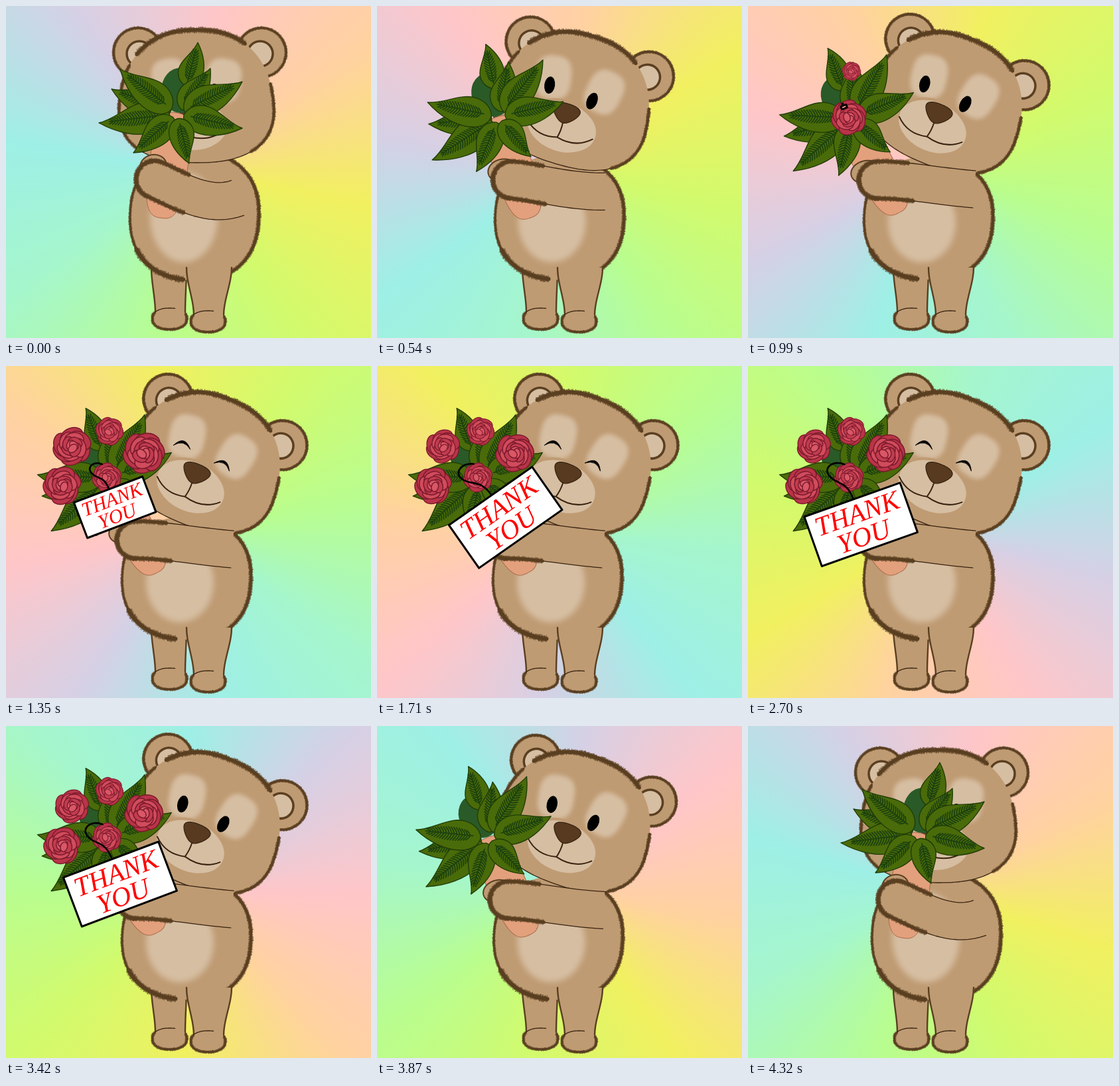
These frames come from a looping animation (550x500 px, 4410 ms). An HTML page with a canvas:

```html
<!DOCTYPE html>
<html lang="en">
<head>
<meta charset="utf-8">
<title>Thank you bear</title>
<style>
  html, body { margin: 0; width: 550px; height: 500px; overflow: hidden; }
  canvas { display: block; }
</style>
</head>
<body>
<canvas id="stage" width="550" height="500"></canvas>
<script>
const ctx = document.getElementById('stage').getContext('2d');
const LOOP = 4410, STEP = 90, TAU = Math.PI * 2;
const FUR = '#bf9b73', PALE = '#d6bea2', FRINGE = '#5a3f21', INK = '#382311';

const rad = d => d * Math.PI / 180;
const mix = (a, b, p) => a + (b - a) * p;
const mixPt = (a, b, p) => a.map((v, i) => mix(v, b[i], p));
const seg = (t, a, b) => Math.min(1, Math.max(0, (t - a) / (b - a)));
const ease = u => u * u * (3 - 2 * u);
const noise = n => { const v = Math.sin(n * 12.9898) * 43758.5453; return v - Math.floor(v); };

// ---------- drawing helpers ----------
function paint(fill, line, width = 1.3) {
  if (fill) { ctx.fillStyle = fill; ctx.fill(); }
  if (line) { ctx.strokeStyle = line; ctx.lineWidth = width; ctx.stroke(); }
}

function trace(pts) {
  ctx.beginPath();
  pts.forEach(p => ctx.lineTo(p[0], p[1]));
}

function line(pts, color = INK, width = 1.3) { trace(pts); paint(null, color, width); }

function oval(x, y, rx, ry, rot, fill, stroke, width) {
  ctx.beginPath();
  ctx.ellipse(x, y, rx, ry, rad(rot), 0, TAU);
  paint(fill, stroke, width);
}

// Rounded shape: n squares it off, k widens its lower half.
function ring({ x, y, rx, ry, rot = 0, n = 2, k = 0 }, from = 0, to = 360) {
  const pts = [], bend = v => Math.sign(v) * Math.abs(v) ** (2 / n);
  const c = Math.cos(rad(rot)), s = Math.sin(rad(rot));
  for (let a = from; a <= to; a += 2) {
    const v = bend(Math.sin(rad(a))), py = ry * v;
    const px = rx * bend(Math.cos(rad(a))) * (1 + k * v);
    pts.push([x + px * c - py * s, y + px * s + py * c]);
  }
  return pts;
}

function fill(pts, color, stroke, width) {
  trace(pts);
  ctx.closePath();
  paint(color, stroke, width);
}

// Dark fuzzy edge: a solid band with fine hairs on both sides.
function fringe(pts, w) {
  line(pts, FRINGE, w * 0.65);
  ctx.beginPath();
  for (let i = 1, id = 0; i < pts.length; i++) {
    const [x, y] = pts[i - 1], dx = pts[i][0] - x, dy = pts[i][1] - y;
    const d = Math.hypot(dx, dy) || 1;
    for (let m = 0; m < d; m += 0.9, id++) {
      const px = x + dx * m / d, py = y + dy * m / d;
      const a = w * (0.3 + 0.3 * noise(id)), b = w * (0.3 + 0.3 * noise(id + 500));
      ctx.moveTo(px - dy / d * a, py + dx / d * a);
      ctx.lineTo(px + dy / d * b, py - dx / d * b);
    }
  }
  paint(null, FRINGE, 0.8);
}

function soft(px, draw) {
  ctx.filter = `blur(${px}px)`;
  draw();
  ctx.filter = 'none';
}

function group(x, y, angle, draw) {
  ctx.save();
  ctx.translate(x, y);
  ctx.rotate(rad(angle));
  draw();
  ctx.restore();
}

// ---------- backdrop ----------
const WHEEL = ['#ffc6c8', '#ffd2a0', '#f1f060', '#d2fa6c', '#b8fd90', '#a5f6cc', '#9eefe6', '#d6d0e5'];

function backdrop(t) {
  const g = ctx.createConicGradient(rad(-80) - TAU * t / LOOP, 275, 250);
  for (let i = 0; i <= 8; i++) g.addColorStop(i / 8, WHEEL[i % 8]);
  ctx.fillStyle = g;
  ctx.fillRect(0, 0, 550, 500);
}

// ---------- bear ----------
function leg(left, right, lowLeft, lowRight, y) {
  const side = (top, low) => {
    const pts = [];
    for (let u = 0; u <= 1; u += 0.1) pts.push([mix(top, low, ease(u)), mix(394, y - 9, u)]);
    return pts;
  };
  const a = side(left, lowLeft), b = side(right, lowRight);
  const foot = { x: (lowLeft + lowRight) / 2 - 1, y, rx: 26, ry: 16, n: 2.3 };
  fill([...a, ...b.reverse()], FUR);
  line(a, FRINGE, 2.4);
  line(b, FRINGE, 2.4);
  fill(ring(foot), FUR);
  fringe(ring(foot, -25, 215), 4);
  line(ring(foot, 215, 285));
}

function torso(p) {
  const body = { x: mix(284, 272, p), y: mix(316, 320, p), rx: 97, ry: mix(97, 92, p), rot: 3, n: 2.3 };
  fill(ring(body), FUR);
  soft(4, () => oval(mix(268, 262, p), mix(318, 326, p), 51, mix(68, 60, p), 0, PALE));
  fringe(ring(body, -65, 55), 6);
  fringe(ring(body, 150, 225), 4);
  fringe(ring(body, 95, 150), 9);
}

function eye(x, y, tilt, shut) {
  group(x, y, tilt, () => {
    if (!shut) return oval(0, 0, 8, 13, 0, '#000');
    ctx.beginPath();
    ctx.moveTo(-13, 5);
    ctx.quadraticCurveTo(0, -15, 13, 5);
    ctx.quadraticCurveTo(0, -8, -13, 5);
    paint('#000', '#000', 0.8);
  });
}

function face(shut) {
  soft(3, () => [-1, 1].forEach(s =>
    fill(ring({ x: s * 40, y: -24, rx: 27, ry: 33, rot: s * 10, n: 2.8 }), PALE)));
  oval(-7, 44, 55, 39, 2, PALE, FUR, 4);
  eye(-42, -11, -8, shut);
  eye(26, -6, 6, shut);
  fill(ring({ x: -7, y: 23, rx: 19, ry: 15, n: 2.2, k: -0.45 }), '#573a1f', INK);
  ctx.beginPath();
  ctx.moveTo(-7, 38);
  ctx.quadraticCurveTo(-6, 50, -9, 61);
  for (const s of [-1, 1]) {
    ctx.moveTo(-9, 61);
    ctx.quadraticCurveTo(-8 + s * 30, 69, -8 + s * 51, 49);
  }
  paint(null, INK, 2);
}

function head(p, shut) {
  const skull = { x: 0, y: 0, rx: 115, ry: 100, n: 2.4, k: 0.12 };
  group(mix(287, 301, p), mix(136, 143.5, p), mix(0, 22.1, p), () => {
    for (const s of [-1, 1]) {
      const ear = { x: 5 + s * 93, y: -66, rx: 37, ry: 37 };
      fill(ring(ear), FUR);
      fringe(ring(ear), 4);
      oval(ear.x - s * 2, ear.y + 2, 19, 19, 0, PALE, FRINGE, 3.5);
    }
    fill(ring(skull), FUR);
    line(ring(skull, 50, 130));
    fringe(ring(skull, -8, 55), 5);
    fringe(ring(skull, 130, 205), 5);
    fringe(ring(skull, 215, 312), 8);
    face(shut);
  });
}

// Spine of the arm, hand first.
const ARM_UP = [[224, 261], [262, 278], [305, 305], [349, 289]];
const ARM_OUT = [[195, 262], [235, 261], [280, 271], [341, 276]];

function arm(p) {
  const [a, b, c, d] = ARM_UP.map((v, i) => mixPt(v, ARM_OUT[i], p));
  const r = 28, top = [], low = [];
  let tilt;
  for (let i = 20; i >= 0; i--) {
    const u = i / 20, w = 1 - u;
    const at = j => w ** 3 * a[j] + 3 * w * w * u * b[j] + 3 * w * u * u * c[j] + u ** 3 * d[j];
    const slope = j => w * w * (b[j] - a[j]) + 2 * w * u * (c[j] - b[j]) + u * u * (d[j] - c[j]);
    tilt = Math.atan2(slope(1), slope(0));
    const nx = Math.sin(tilt) * r, ny = -Math.cos(tilt) * r;
    top.push([at(0) + nx, at(1) + ny]);
    low.unshift([at(0) - nx, at(1) - ny]);
  }
  const deg = tilt * 360 / TAU;
  const cap = ring({ x: a[0], y: a[1], rx: r, ry: r, rot: deg }, 90, 270).reverse();
  const edge = [...top, ...cap, ...low];
  fill(edge, FUR);
  line(edge);
  fringe([...top.slice(13), ...cap, ...low.slice(0, 10)], 7);
}

function fist(p) {
  const hand = { x: mix(222, 178, p), y: mix(241, 250, p), rx: mix(20, 23, p), ry: 17, rot: -12 };
  fill(ring(hand), FUR, FRINGE, 2);
}

// ---------- bouquet ----------
// Leaf tips from the middle of the bunch, with how far out the leaf begins.
const TIPS = [
  [34, -100, 0.4], [53, -61], [-96, -30], [-115, 21], [-83, -60],
  [-63, 66], [101, -41], [101, 29], [21, 82]
];

function leaf([tx, ty, from = 0.1]) {
  const x = tx * from + 3, y = ty * from + 6;
  const len = Math.hypot(tx - x, ty - y), w = 9 + 0.13 * len;
  group(x, y, Math.atan2(ty - y, tx - x) * 360 / TAU, () => {
    ctx.scale(1, tx < 0 ? 1 : -1);
    ctx.beginPath();
    ctx.moveTo(0, 0);
    ctx.bezierCurveTo(0, -w * 1.2, len * 0.5, -w * 1.7, len, 0);
    ctx.bezierCurveTo(len * 0.75, w * 0.1, len * 0.5, w * 1.2, len * 0.25, w * 0.95);
    ctx.quadraticCurveTo(len * 0.05, w * 0.75, 0, 0);
    paint('#4a6b09', '#213d08', 1.4);
    ctx.beginPath();
    ctx.moveTo(len * 0.12, 0);
    ctx.lineTo(len * 0.85, 0);
    for (let u = 0.16; u < 0.8; u += 4 / len) {
      const h = w * 0.45 * Math.sin(Math.PI * (u + 0.1));
      for (const s of [-1, 1]) {
        ctx.moveTo(len * u, 0);
        ctx.quadraticCurveTo(len * u + 2, s * h * 0.6, len * u + 6, s * h);
      }
    }
    paint(null, '#1c410e', 1.8);
  });
}

const REDS = ['#b93448', '#d04c5c', '#c23c4f', '#d95766'];

function rose(x, y, size, seed, s) {
  if (s <= 0) return;
  group(x, y, seed * 40 - 35, () => {
    ctx.scale(size * s, size * s);
    REDS.forEach((color, layer) => {
      const count = 6 - layer, far = 0.25 - layer * 0.065;
      for (let i = 0; i < count; i++) {
        const a = (i + 0.4 * noise(seed * 9 + layer * 7 + i)) * TAU / count + layer;
        const r = 0.29 - layer * 0.055;
        oval(Math.cos(a) * far, Math.sin(a) * far, r, r * 0.72, a * 360 / TAU + 70, color, '#7a1a2c', 0.025);
      }
    });
  });
}

// Grows past full size and settles.
function pop(u) {
  const v = seg(u, 0, 1) - 1;
  return Math.max(0, 1 + 3.6 * v ** 3 + 2.6 * v * v);
}

function bouquet(p, t) {
  group(mix(255, 150, p), mix(155, 165, p), mix(0, -35.2, p), () => {
    fill(ring({ x: -10, y: 85, rx: 29, ry: 80, rot: 8, n: 3 }), '#e3a07c', '#a86a4a', 1);
    oval(8, -28, 29, 34, 0, '#2a5a28');
    TIPS.forEach(leaf);
    ctx.rotate(rad(35.2));
    const grow = start => pop((t - start) / 330) * (1 - seg(t, 3510, 3750));
    [58, 53, 44, 60].forEach((size, i) => {
      const a = rad(-103 + 54 * i);
      rose(67 * Math.sin(a), -67 * Math.cos(a), size, i, grow(i === 2 ? 940 : 1060 + 60 * i));
    });
    rose(2, 3, 46, 4, grow(820));
  });
}

// ---------- card ----------
function cardAngle(t) {
  if (t < 1710) return mix(-20.8, -35, seg(t, 1440, 1710));
  const n = (t - 1710) / 330;
  return -20.8 - 14.2 * 0.45 ** n * Math.cos(Math.PI * n);
}

function card(t) {
  const s = seg(t, 960, 1500) * (1 - seg(t, 3480, 3720));
  if (s <= 0) return;
  group(143, 147, cardAngle(t), () => {
    ctx.scale(s, s);
    ctx.beginPath();
    ctx.moveTo(2, 2);
    ctx.bezierCurveTo(-12, -11, -32, -4, -25, 12);
    ctx.bezierCurveTo(-19, 27, -3, 26, -3, 56);
    paint(null, '#000', 2.6 / s);
    ctx.translate(-5, 95.5);
    ctx.beginPath();
    ctx.rect(-76.5, -39.5, 153, 79);
    paint('#fff', '#000', 3 / s);
    ctx.fillStyle = '#f00';
    ctx.font = 'italic 41px "Liberation Serif", serif';
    ctx.textAlign = 'center';
    ctx.fillText('THANK', 0, -4);
    ctx.fillText('YOU', -2, 32);
  });
}

// ---------- loop ----------
function draw(t) {
  const p = ease(seg(t, 180, 720)) * (1 - ease(seg(t, 3780, 4230)));
  ctx.lineJoin = ctx.lineCap = 'round';
  backdrop(t);
  leg(219, 272, 225, 270, 471);
  torso(p);
  leg(272, 340, 283, 328, 475);
  head(p, t >= 1350 && t < 3060);
  bouquet(p, t);
  fist(p);
  arm(p);
  card(t);
}

let last = -1;
const start = performance.now();
function tick() {
  const t = Math.floor(((performance.now() - start) % LOOP) / STEP) * STEP;
  if (t !== last) draw(last = t);
  requestAnimationFrame(tick);
}
tick();
</script>
</body>
</html>
```
